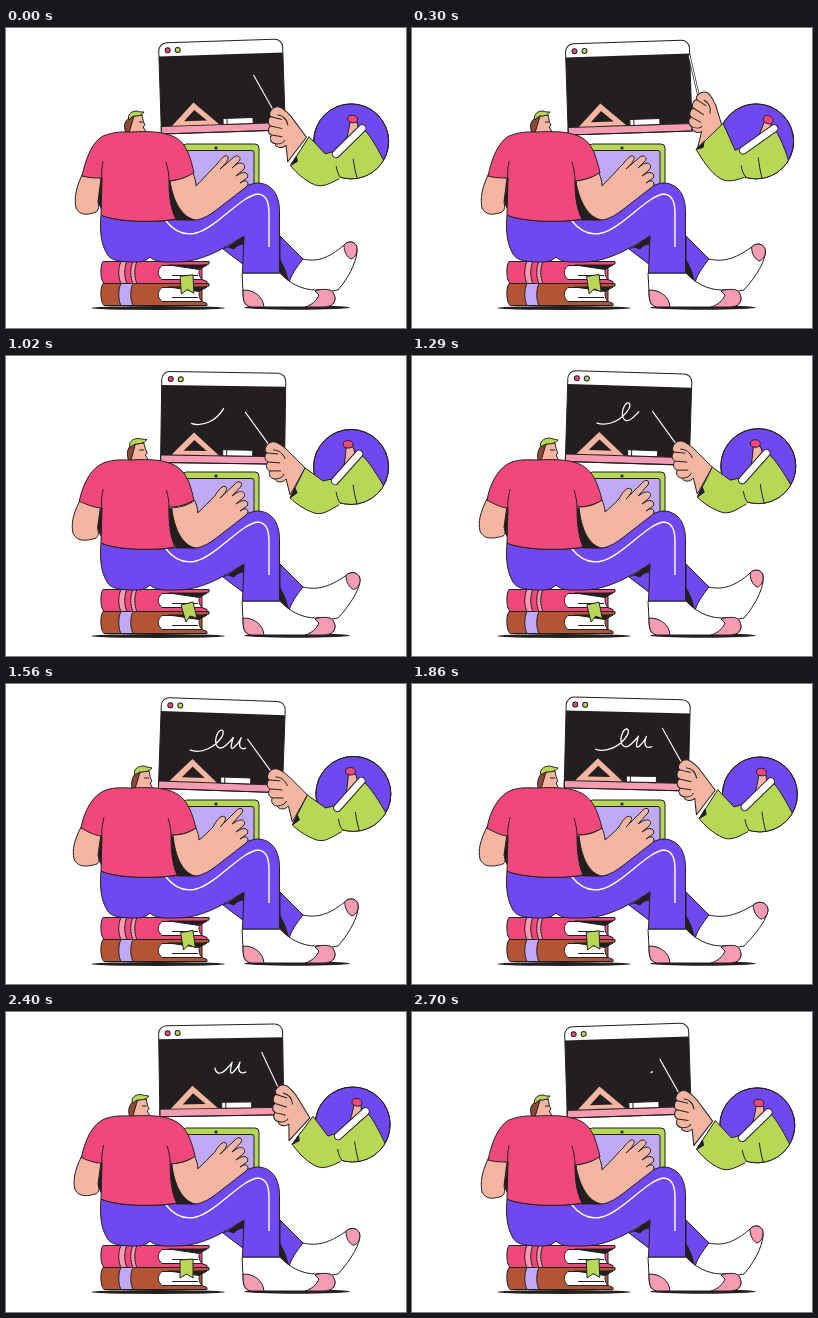
Animation, 400 px wide and 300 px high, one loop 2730 ms. Source, as an HTML page with a canvas:

```html
<!DOCTYPE html>
<html lang="en">
<head>
<meta charset="utf-8">
<title>Online lesson</title>
<style>
html, body { margin: 0; width: 100%; height: 100%; overflow: hidden; background: #fff; }
canvas { display: block; width: 400px; height: 300px; }
svg { position: absolute; width: 0; height: 0; }
</style>
</head>
<body>
<canvas id="stage"></canvas>
<svg><path id="ink" d="M-32 6C-20 10 -6 2 0 -9C3 -16 -3 -18 -6 -8C-8 2 -2 6 4 0C8 -4 10 -6 11 -8C9 0 8 5 12 2C15 -1 18 -5 19 -8C16 0 18 5 25 2"/></svg>
<script>
const LOOP = 2730;
const C = {
  ink: '#231f20', white: '#fff', pink: '#f0487a', rose: '#f59bb2', skin: '#f4b5a1',
  purple: '#7048f0', lilac: '#c0aaf5', lime: '#b7d857', brown: '#b35434', hair: '#8c4a35'
};
const canvas = document.getElementById('stage');
const g = canvas.getContext('2d');
const dpr = window.devicePixelRatio || 1;
canvas.width = 400 * dpr;
canvas.height = 300 * dpr;

const inkPath = document.getElementById('ink');
const inkShape = new Path2D(inkPath.getAttribute('d'));
const inkLength = inkPath.getTotalLength();

const clamp = v => Math.max(0, Math.min(1, v));
const lerp = (a, b, k) => a + (b - a) * k;
const ramp = (t, from, to) => clamp((t - from) / (to - from));
const smooth = k => k * k * (3 - 2 * k);
const wave = (t, peak, period = LOOP) => Math.cos(2 * Math.PI * (t - peak) / period);

// Eased value from [time, value] steps
function track(t, steps) {
  let i = 1;
  while (i < steps.length - 1 && t > steps[i][0]) i++;
  const [t0, a] = steps[i - 1], [t1, b] = steps[i];
  return lerp(a, b, smooth(ramp(t, t0, t1)));
}

// Blends two path strings that share the same commands
function mix(a, b, k) {
  const nums = b.match(/-?[\d.]+/g);
  let i = 0;
  return a.replace(/-?[\d.]+/g, n => lerp(+n, +nums[i++], k).toFixed(2));
}

function shape(d, fill, stroke = C.ink, width = 1) {
  const p = d instanceof Path2D ? d : new Path2D(d);
  if (fill) { g.fillStyle = fill; g.fill(p); }
  if (stroke) { g.strokeStyle = stroke; g.lineWidth = width; g.stroke(p); }
}
const line = (d, color = C.ink, width = 1) => shape(d, null, color, width);

function ellipse(x, y, rx, ry, fill, stroke = C.ink) {
  const p = new Path2D();
  p.ellipse(x, y, rx, ry, 0, 0, 7);
  shape(p, fill, stroke);
}

function group(x, y, deg, draw) {
  g.save();
  g.translate(x, y);
  g.rotate(deg * Math.PI / 180);
  draw();
  g.restore();
}

function board(t) {
  const x = 216.2 + 1.2 * wave(t, 780), y = 60.1 + 1.8 * wave(t, 1130);
  group(x, y, -2 * wave(t, 150), () => {
    const frame = new Path2D();
    frame.roundRect(-62, -45.5, 124, 91, [8, 8, 0, 0]);
    shape(frame, C.white, null);
    shape('M-62 -32H62V38H-62Z', C.ink, null);
    shape('M-62 38H62V45.5H-62Z', C.rose);
    shape(frame, null);
    ellipse(-53, -38, 2.5, 2.5, C.pink);
    ellipse(-43, -38, 2.5, 2.5, C.lime);
    const square = new Path2D('M-51 37.5L-29 15L-4 37.5ZM-39 33.5L-28.5 22.5L-16 33.5Z');
    g.fillStyle = C.skin;
    g.fill(square, 'evenodd');
    shape('M0 32H30V38H0Z', C.white);
    line('M4 32V38');

    const start = ramp(t, 2130, 2715) * inkLength;
    const end = ramp(t, 780, 1570) * inkLength;
    if (end > start) {
      g.setLineDash([0, start, end - start, inkLength * 2]);
      line(inkShape, C.white, 1.3);
      g.setLineDash([]);
    }
  });
}

function teacher(t) {
  const lift = track(t, [[0, .3], [300, 1], [780, 0], [1560, 0], [2160, .6], [LOOP, .3]]);
  const pose = (low, high) => mix(low, high, lift);
  const bow = 4 * lift * (1 - lift);
  const arc = (low, high) => [
    lerp(low[0], high[0], lift) - 4 * bow,
    lerp(low[1], high[1], lift) - 2.5 * bow
  ];
  group(345.9 - 2 * wave(t, 520), 111.7 + 1.8 * wave(t, 150), 0, () => {
    const disc = new Path2D();
    disc.arc(0, 0, 37.5, 0, 7);
    shape(disc, C.purple);

    // Head and torso
    shape(pose('M-5 -19L2 -20L4 -14L2 -3L-8 6L-6 -9Z', 'M8 -19L15 -18L14 -11L8 -1L-3 4L4 -9Z'), C.skin);
    shape(pose('M-8 -23C-8 -27 1 -28 2 -23C2 -19 -1 -19 -3 -19C-6 -19 -8 -20 -8 -23Z',
      'M7 -23C8 -28 17 -26 17 -21C16 -17 13 -17 11 -18C8 -19 7 -20 7 -23Z'), C.pink);
    g.save();
    g.clip(disc);
    shape(pose('M-20 13L9 -13C15 -9 22 1 32 18L42 42H-30Z',
      'M-16 8L18 -13C22 -8 28 5 32 18L42 42H-30Z'), C.lime);
    g.restore();
    shape(disc, null);

    // Pointer and forearm
    const [hx, hy] = arc([-75, -8], [-54, -32]);
    const [tx, ty] = arc([-106, -55], [-67, -86]);
    const rod = `M${tx} ${ty}L${hx - 2} ${hy - 7}`;
    line(rod, C.ink, 2.4);
    line(rod, C.white, 1.1);
    group(hx, hy, 28 * lift, () => {
      shape('M-4 -17C0 -18 6 -13 10 -10L29 9L14 36L10 20C7 24 0 24 -1 20C-6 20 -8 15 -6 12' +
        'C-10 11 -11 5 -8 3C-12 2 -12 -5 -9 -6C-13 -8 -10 -16 -4 -17Z', C.skin);
      line('M-9 -6L2 -5M-8 3L4 4M-6 12L5 12M-1 20C3 20 7 18 8 15M-3 -9C2 -9 7 -6 9 0');
    });

    // Sleeve
    const sleeve = pose('M-12 38C-20 42 -28 49 -37 46C-48 42 -56 36 -61 31L-46 1L-28 14L-19 12',
      'M-12 36C-18 38 -28 42 -36 37C-46 31 -54 18 -60 8L-33 -18L-21 9L-15 6');
    shape(sleeve + 'L0 20Z', C.lime, null);
    line(sleeve);
    shape(pose('M-61 31L-56 21L-54 26Z', 'M-60 8L-52 0L-53 6Z'), C.ink);
    line(pose('M-15 25C-14 30 -13 34 -10 37M2 18C3 25 4 30 6 37',
      'M-15 24C-14 29 -13 33 -10 36M2 16C3 23 4 30 6 37'));

    const collar = pose('M-16 14L8 -13', 'M-13 9L18 -13');
    g.lineCap = 'round';
    line(collar, C.ink, 8.5);
    line(collar, C.white, 6.5);
  });
}

function book(y, cover, band, bands) {
  shape(`M97 ${y}H203V${y + 2.5}L196 ${y + 4}V${y + 18}L201 ${y + 20}V${y + 22}H98C94 ${y + 18} 94 ${y + 4} 97 ${y}Z`, cover);
  shape(`M156 ${y + 4}H196C192 ${y + 8} 192 ${y + 14} 196 ${y + 18}H156C151 ${y + 14} 151 ${y + 8} 156 ${y + 4}Z`, C.white);
  shape(`M163 ${y + 3.5}H201L193 ${y + 8}Z`, C.ink);
  line(`M166 ${y + 14}H192`);
  for (const [x, w] of bands) {
    shape(`M${x} ${y}H${x + w}C${x + w - 3} ${y + 6} ${x + w - 3} ${y + 16} ${x + w} ${y + 22}H${x}C${x - 3} ${y + 16} ${x - 3} ${y + 6} ${x} ${y}Z`, band);
  }
}

function books(t) {
  ellipse(152, 280, 67, 2, C.ink, null);
  ellipse(291, 279.5, 53, 2.2, C.ink, null);
  book(255.5, C.brown, C.lilac, [[115, 12]]);
  book(233.5, C.pink, C.rose, [[115, 6], [127, 4]]);
  shape(mix('M174 248L187 247L187 266L180.5 262L174 266Z', 'M175 249L187 246L191 262L184 260L180 266Z',
    .5 + .5 * wave(t, 950)), C.lime);
}

function legs(t) {
  const drop = .5 - .5 * wave(t, 0, LOOP / 2);
  shape('M274 208L297 231L283 256L274 246Z', C.purple);
  shape('M274 232C278 238 281 247 283 256L274 246Z', C.ink);
  shape(mix('M297 231C310 234 322 231 338 217C342 212 351 213 351 221C352 228 346 246 332 262L310 266C300 262 290 259 283 255C285 247 290 240 297 231Z',
    'M297 231C310 234 322 233 342 222C347 217 356 219 357 226C357 234 346 248 332 262L310 266C300 262 290 259 283 255C285 247 290 240 297 231Z', drop), C.white);
  shape(mix('M338 217C342 212 351 213 351 221C351 227 348 230 345 231C341 229 338 224 338 217Z',
    'M342 222C347 217 356 219 357 226C357 232 354 235 350 236C346 234 342 229 342 222Z', drop), C.rose);

  shape('M236 245H274C282 254 295 262 310 262C322 260 329 264 329 271C328 277 324 279 316 279H245C238 278 237 272 237 264Z', C.white);
  shape('M237 262C248 262 257 268 258 279H245C238 278 237 272 237 262Z', C.rose);
  shape('M299 279C306 277 311 272 313 267L309 263C314 261 321 261 324 262C328 264 329 268 329 271C328 277 324 279 316 279Z', C.rose);

  shape('M217 221L238 237V211Z', C.purple);
  shape('M222 219L238 208V216C234 216 230 218 228 221Z', C.ink);
  shape('M95 187C94 200 94 214 101 226C105 233 115 234 130 234C137 234 141 232 144 229C147 232 153 234 160 234H170C195 234 215 222 238 208L236.5 245H273.5L273.5 185' +
    'C274 166 265 155 251 155C238 156 215 172 188 192L174 191C150 195 110 194 95 187Z', C.purple);
  line('M160 193C168 203 178 208 190 205C210 200 236 167 252 166C261 167 263 175 263 186V219', C.white, 1.4);
}

function laptop() {
  const lid = new Path2D(), screen = new Path2D();
  lid.roundRect(176.5, 116, 76.5, 52, 4);
  screen.roundRect(180, 122.5, 68, 42, 2);
  shape(lid, C.lime);
  shape(screen, C.lilac);
  ellipse(210, 120, 1.6, 1.6, C.ink, null);
}

function student(t) {
  const down = track(t, [[0, 0], [350, 0], [750, 1], [LOOP, 1]]);
  const point = track(t, [[0, 0], [800, 0], [1200, 1], [2200, 1], [2660, 0], [LOOP, 0]]);
  const back = t > 2000;
  // Rest -> looking down -> pointing -> rest
  const pose = (rest, low, aim) => mix(back ? rest : mix(rest, low, down), aim, point);

  // Far arm
  shape('M96 148V182L91 172Z', C.ink);
  shape(pose('M76 147C70 160 68 170 70 180C74 188 82 187 90 184C93 182 93 178 92 174L95 150Z',
    'M72 147C66 160 63 170 66 181C70 189 80 188 88 185C92 183 92 178 91 173L94 150Z',
    'M75 143C68 157 66 166 68 175C72 185 84 182 91 180C94 178 93 175 92 171L95 150Z'), C.skin);

  // Head
  shape(pose('M120 105C117 97 119 93 123 90L129 88C130 95 128 99 128 105Z', 'M118 105C115 98 114 94 117 91L124 88C125 95 123 99 123 105Z',
    'M126 105C125 98 126 94 129 90L135 88C136 95 134 99 133 105Z'), C.hair);
  shape(pose('M128 88L136 87C137 91 137 94 139 97L137 99L141 105L123 105Z',
    'M123 88L131 87C132 91 133 94 135 97L133 99L138 105L119 105Z',
    'M134 88L143 87C144 91 144 94 146 97L144 99L147 105L129 105Z'), C.skin);
  line(pose('M133 94L137 94', 'M127 94L131 94', 'M138 94L143 94'));
  shape(pose('M123 92C121 87 125 83 131 83C133 84 135 84 138 84C136 88 131 88 128 88C126 89 124 90 123 92Z',
    'M117 92C116 87 120 83 126 83C128 84 131 83 134 83C132 87 126 88 123 88C121 89 119 90 117 92Z',
    'M129 91C127 86 131 82 138 82C140 83 142 83 146 84C143 88 137 88 134 88C132 89 130 90 129 91Z'), C.lime);

  // Near arm shadow, then shirt
  shape(mix('M161 152C160 172 164 184 170 192L189 192L170 153Z', 'M164 152C164 172 166 184 171 192L191 192L173 153Z', point), C.ink);
  shape(pose('M97 108C110 103 118 104 126 104C140 103 155 104 160 106C176 110 182 118 188 145C180 150 172 152 163 153C163 170 165 182 170 191C150 195 110 194 95 187L96 150C90 150 83 150 76 148C80 130 86 114 97 108Z',
    'M95 108C108 103 116 104 124 104C140 103 153 104 158 106C174 110 181 118 185 144C178 149 170 151 160 151C160 170 162 182 166 191C150 195 110 194 95 187L96 152C90 152 80 150 71 147C75 130 82 114 95 108Z',
    'M100 106C109 103 116 104 126 104C140 103 156 104 161 106C177 110 184 120 190 144C182 149 174 151 165 151C165 170 167 182 171 191C150 195 110 194 95 187L96 152C90 152 82 148 75 144C78 128 86 111 100 106Z'), C.pink);
  line(pose('M96 152C95 145 96 139 97 133M163 153C163 147 162 140 160 134',
    'M96 152C94 145 95 139 96 133M160 151C161 147 160 140 158 134',
    'M96 152C95 145 97 139 98 133M165 151C165 147 164 140 162 134'));

  // Near arm
  const fist = 'L230 148L235 145C241 143 244 148 240 151L234 155L237 153C243 152 243 157 240 159L213 180C205 186 198 191 190 192';
  const open = 'M164 153C172 152 180 150 187 145C189 150 190 154 190 158C197 151 205 142 211 136C215 131 220 125 222 129C223 132 219 136 214 141' +
    'L228 129C232 126 236 130 233 133L226 140L231 136C237 133 241 138 237 142' + fist + 'C176 190 167 173 164 153Z';
  const aimed = 'M167 151C175 151 183 149 190 144C192 149 193 152 193 156C198 152 203 147 207 143C210 137 215 130 219 133C221 136 217 140 214 143' +
    'L231 126C235 122 239 126 235 130L226 140L231 137C237 134 241 138 237 142' + fist + 'C177 190 169 173 167 151Z';
  shape(mix(open, aimed, point), C.skin);
}

function render(t) {
  g.setTransform(dpr, 0, 0, dpr, 0, 0);
  g.lineJoin = 'round';
  g.lineCap = 'butt';
  g.fillStyle = C.white;
  g.fillRect(0, 0, 400, 300);
  board(t);
  laptop();
  books(t);
  legs(t);
  student(t);
  teacher(t);
}

const begin = performance.now();
function tick() {
  render(Math.floor((performance.now() - begin) % LOOP / 30) * 30);
  requestAnimationFrame(tick);
}
tick();
</script>
</body>
</html>
```
